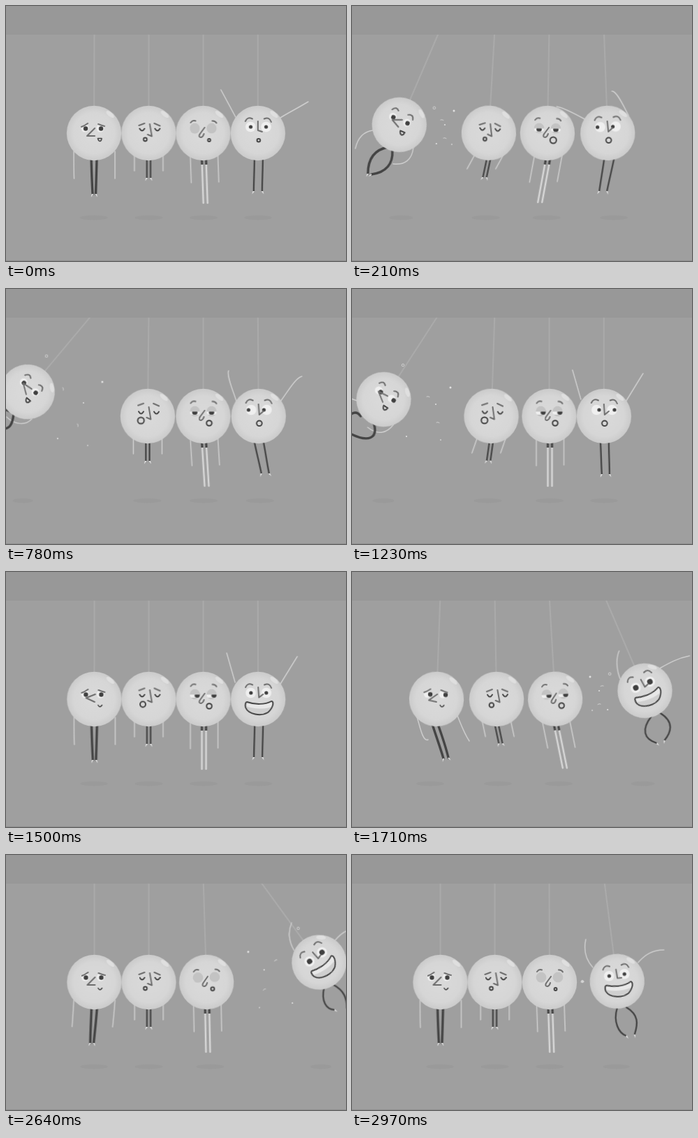
Write an HTML page without scripts that moves like this. It is 487 px wide and 365 px high and loops after 3000 ms.

```html
<!DOCTYPE html>
<html lang="en">
<head>
<meta charset="utf-8">
<title>Cradle</title>
<style>
html, body { margin: 0; width: 100%; height: 100%; overflow: hidden; background: #9f9f9f; }
svg { display: block; width: 487px; height: 365px; }
path, line { fill: none; stroke-linecap: round; stroke-linejoin: round; }

.anim, .swing, .level, .lean, .bit { animation: 3s ease-in-out infinite; }
.late { animation-delay: -1.5s; }

/* balls hang from a pivot; limbs are turned back upright */
.swing { --k: 1; transform-origin: 0 -149px; }
.level { --k: -1; }
.left { --s: 1; }
.right { --s: -1; }
.outer { animation-name: outer; }
.inner { animation-name: inner; }
@keyframes outer {
  0% { transform: rotate(0deg); animation-timing-function: cubic-bezier(.17,.48,.45,1); }
  25% { transform: rotate(calc(var(--s) * var(--k) * 40deg)); animation-timing-function: cubic-bezier(.76,0,.88,.4); }
  50% { transform: rotate(0deg); animation-timing-function: ease-out; }
  57% { transform: rotate(calc(var(--s) * var(--k) * 2.1deg)); }
  74% { transform: rotate(calc(var(--s) * var(--k) * .4deg)); }
  85%, 100% { transform: rotate(0deg); }
}
@keyframes inner {
  0% { transform: rotate(0deg); animation-timing-function: ease-out; }
  7% { transform: rotate(calc(var(--s) * var(--k) * 3.3deg)); }
  26% { transform: rotate(calc(var(--s) * var(--k) * .6deg)); }
  41% { transform: rotate(calc(var(--s) * var(--k) * 1.9deg)); }
  46% { transform: rotate(calc(var(--s) * var(--k) * 2.8deg)); }
  49% { transform: rotate(calc(var(--s) * var(--k) * .2deg)); }
  50% { transform: rotate(0deg); animation-timing-function: ease-out; }
  57% { transform: rotate(calc(var(--s) * var(--k) * -1deg)); }
  72%, 100% { transform: rotate(0deg); }
}

.string { stroke: #bcbcbc; stroke-width: .8; }
.arm { stroke: #cecece; stroke-width: 1.5; }
.leg { stroke: #444; stroke-width: 2.3; }
.thick { stroke-width: 3.4; }
.pale { stroke: #d6d6d6; stroke-width: 2.5; }
.short { stroke-width: 3.2; stroke-linecap: butt; }
.brow, .nose { stroke: #6e6e6e; stroke-width: 2; }
.ink { stroke: #444; stroke-width: 2; fill: none; }
.fine { stroke-width: 1.6; }
.white { fill: #efefef; }
.pupil { fill: #404040; }
.lid { fill: #c3c3c3; }
.foot { fill: #e6e6e6; }
.lf { marker-end: url(#footL); }
.rf { marker-end: url(#footR); }

/* straight limbs */
.lean { transform-box: fill-box; transform-origin: 50% 0; }
.lean2 { animation-name: lean2; }
.lean3 { animation-name: lean3; }
@keyframes lean2 {
  0%, 26%, 50%, 74%, 100% { transform: rotate(0deg); }
  7% { transform: rotate(calc(12deg * var(--m, 1))); }
  41% { transform: rotate(calc(8deg * var(--m, 1))); }
  57% { transform: rotate(-12deg); }
}
@keyframes lean3 {
  0%, 100% { transform: rotate(-2deg); }
  7% { transform: rotate(10.5deg); }
  26% { transform: rotate(-3.6deg); }
  41%, 50%, 74% { transform: rotate(0deg); }
  57% { transform: rotate(-11.5deg); }
}

/* first ball */
.armA { animation-name: armA; }
.armB { animation-name: armB; }
.legA { animation-name: legA; }
.legB { animation-name: legB; }
@keyframes armA {
  0%, 50%, 97%, 100% { d: path("M-29 26C-29 39 -29 52 -28.5 65"); }
  7% { d: path("M-38 8C-52 10 -60 20 -63 34"); }
  26% { d: path("M-38 10C-50 5 -60 0 -68 -8"); }
  41% { d: path("M-38 2C-42 1 -46 -1 -52 -3"); }
  57% { d: path("M-28 26C-24 37 -20 62 -12 58"); }
  74% { d: path("M-30 24C-32 35 -35 47 -39 61"); }
}
@keyframes armB {
  0%, 50%, 97%, 100% { d: path("M30 26C30 39 30 52 30 65"); }
  7% { d: path("M20 33C18 50 8 58 -9 56"); }
  26% { d: path("M6 39C-2 48 -18 48 -30 36"); }
  41% { d: path("M14 36C5 48 -8 52 -23 40"); }
  57% { d: path("M30 24C35 36 40 50 47 60"); }
  74% { d: path("M29 25C26 36 23 48 18 62"); }
}
@keyframes legA {
  0%, 50%, 97%, 100% { d: path("M-4 36C-3.5 55 -3 70 -2 87"); }
  7% { d: path("M-16 32C-38 36 -45 52 -45 70"); }
  26% { d: path("M-25 28C-36 22 -44 25 -55 30"); }
  41% { d: path("M-33 24C-38 17 -44 17 -52 26"); }
  57% { d: path("M-6 36C-1 52 5 68 10 85"); }
  74% { d: path("M-4 36C-7 52 -11 70 -14 87"); }
}
@keyframes legB {
  0%, 50%, 97%, 100% { d: path("M4 36C3.5 55 3 70 2.5 87"); }
  7% { d: path("M-10 37C-9 55 -18 68 -40 71"); }
  26% { d: path("M-20 33C-22 48 -26 54 -38 53"); }
  41% { d: path("M-14 35C-8 56 -22 62 -48 49"); }
  57% { d: path("M2 36C7 50 13 67 17 84"); }
  74% { d: path("M4 36C1 52 -4 70 -8 87"); }
}
.browA { animation-name: browA; }
.browB { animation-name: browB; }
.noseA { animation-name: noseA; }
.lookA { animation-name: lookA; }
.mouthA { animation-name: mouthA; transform-origin: 8.5px 9px; }
@keyframes browA {
  0%, 50%, 100% { d: path("M-18 -9Q-13 -11 -9 -14"); }
  6%, 43% { d: path("M-18 -16Q-14 -23 -9 -18"); }
}
@keyframes browB {
  0%, 50%, 100% { d: path("M6 -13Q11 -11 15 -10"); }
  6%, 43% { d: path("M6 -18Q13 -22 15 -14"); }
}
@keyframes noseA {
  0%, 85%, 100% { d: path("M1 -7L-10 4L1 4"); }
  7% { d: path("M1 -8L-12 -2.5L0 3.5"); }
  26%, 43% { d: path("M2 -7L-12.5 -5.5L1 4"); }
  57% { d: path("M1 -7L-11 2L0 4"); }
}
@keyframes lookA {
  0%, 26%, 50%, 74%, 100% { transform: translateX(0); }
  41%, 57% { transform: translateX(2.8px); }
}
@keyframes mouthA {
  0%, 50%, 100% { transform: scale(1); }
  7%, 42% { transform: scale(1.25); }
}

/* second ball */
.brow2 { animation-name: brow2; }
.o2 { animation-name: o2; }
@keyframes brow2 {
  0%, 7%, 55%, 100% { transform: translateY(0); }
  24%, 43% { transform: translateY(-4.2px); }
}
@keyframes o2 {
  0%, 7%, 74%, 100% { r: 2.4px; transform: translate(0, 0); }
  24%, 43% { r: 4.6px; transform: translate(-4.6px, -2.6px); }
  57% { r: 3.3px; transform: translate(-2.4px, -.6px); }
}

/* third ball */
.open { animation-name: open; }
.look3 { animation-name: look3; }
.brow3 { animation-name: brow3; }
.o3 { animation-name: o3; }
@keyframes open {
  0%, 92%, 100% { transform: translateY(0); }
  5%, 72% { transform: translateY(-7.5px); }
}
@keyframes brow3 {
  0%, 92%, 100% { transform: translateY(0); }
  5%, 72% { transform: translateY(-3.5px); }
}
@keyframes look3 {
  0%, 27%, 74%, 100% { transform: translateX(0); }
  40%, 58% { transform: translateX(3.5px); }
}
@keyframes o3 {
  0%, 100% { r: 1.9px; }
  7% { r: 4.5px; }
  26%, 57% { r: 3.8px; }
  74% { r: 3.2px; }
}

/* last ball */
.armC { animation-name: armC; }
.armD { animation-name: armD; }
.legC { animation-name: legC; }
.legD { animation-name: legD; }
@keyframes armC {
  0%, 100% { d: path("M-32 -23C-39 -36 -46 -49 -53 -62"); }
  7% { d: path("M-33 -20C-44 -26 -62 -36 -73 -38"); }
  26% { d: path("M-32 -22C-36 -35 -46 -58 -43 -65"); }
  41%, 50% { d: path("M-33 -24C-37 -38 -41 -52 -45 -66"); }
  57% { d: path("M-34 -14C-42 -30 -41 -48 -37 -57"); }
  74% { d: path("M-37 -12C-42 -30 -38 -45 -31 -50"); }
  99% { d: path("M-35 -20C-46 -32 -48 -46 -45 -60"); }
}
@keyframes armD {
  0%, 100% { d: path("M32 -22C45 -30 59 -37 72 -45"); }
  7% { d: path("M30 -25C24 -36 13 -61 6 -60"); }
  26% { d: path("M32 -22C41 -34 53 -55 62 -57"); }
  41%, 50% { d: path("M32 -22C40 -35 48 -48 56 -61"); }
  57% { d: path("M21 -32C35 -40 48 -47 64 -50"); }
  74% { d: path("M12 -38C17 -45 23 -51 32 -53"); }
  99% { d: path("M30 -27C40 -38 50 -45 67 -45"); }
}
@keyframes legC {
  0%, 50%, 100% { d: path("M-5 37C-5 52 -6 68 -6 83"); }
  7% { d: path("M-5 37C-7 52 -10 68 -12 83"); }
  26% { d: path("M-6 37C-3 52 1 67 4 82"); }
  41% { d: path("M-5 37C-4 52 -4 68 -3 83"); }
  57% { d: path("M9 37C-5 55 -2 69 17 75"); }
  74% { d: path("M18 34C16 52 22 57 36 53"); }
  99% { d: path("M0 38C-6 58 2 74 13 78"); }
}
@keyframes legD {
  0%, 50%, 100% { d: path("M7 37C7 52 6 68 6 83"); }
  7% { d: path("M9 37C6 52 2 68 -1 83"); }
  26% { d: path("M7 37C10 52 12 67 15 82"); }
  41% { d: path("M7 37C7 52 8 68 8 83"); }
  57% { d: path("M22 32C43 45 37 60 28 71"); }
  74% { d: path("M30 24C44 30 55 38 62 52"); }
  99% { d: path("M13 37C31 48 30 60 25 76"); }
}
.browC { animation-name: browC; }
.noseC { animation-name: noseC; }
.lookC { animation-name: lookC; }
.pupilC { animation-name: pupilC; }
.o4 { animation-name: o4; }
@keyframes browC {
  0%, 50%, 100% { transform: translateY(0); }
  7%, 43% { transform: translateY(-2px); }
  56%, 98% { transform: translateY(-4px); }
}
@keyframes noseC {
  0%, 100% { d: path("M0 -17L0 -4L6 -2"); }
  6%, 48% { d: path("M0 -17L1 -2L7 -7"); }
  56%, 98% { d: path("M1 -17L2 -5L8 -7"); }
}
@keyframes lookC {
  0%, 50%, 100% { transform: translateX(0); }
  7%, 27% { transform: translateX(-4px); }
  40%, 44% { transform: translateX(3.5px); }
}
@keyframes pupilC {
  0%, 50%, 99%, 100% { r: 2.6px; }
  56%, 85% { r: 4px; }
}
@keyframes o4 { 0%, 50%, 100% { r: 2.3px; } 6%, 45% { r: 3.8px; } }

/* half-loop switches */
.firstHalf { animation: show 3s step-end infinite; }
.lastHalf { animation: show 3s step-end -1.5s infinite; }
@keyframes show { 0% { opacity: 1; } 50%, 100% { opacity: 0; } }

/* shadows */
.shade { fill: #9a9a9a; }
.sh1 { animation-name: shOuter; }
.sh2 { animation-name: shInner; }
@keyframes shOuter {
  0% { transform: translateX(0); animation-timing-function: cubic-bezier(.17,.4,.45,1); }
  25% { transform: translateX(calc(var(--s) * -102px)) scaleX(.72); animation-timing-function: cubic-bezier(.68,0,.88,.4); }
  50% { transform: translateX(0); }
  57% { transform: translateX(calc(var(--s) * -14px)); }
  74% { transform: translateX(calc(var(--s) * -3px)); }
  85%, 100% { transform: translateX(0); }
}
@keyframes shInner {
  0%, 50%, 74%, 100% { transform: translateX(0); }
  7% { transform: translateX(calc(var(--s) * -13px)); }
  26% { transform: translateX(calc(var(--s) * -2px)); }
  41% { transform: translateX(calc(var(--s) * -10px)); }
  57% { transform: translateX(calc(var(--s) * 4.5px)); }
}

/* sparks fly out and fall back */
.bit { animation-name: bit; stroke: #cfcfcf; stroke-width: 1; fill: none; }
.dot { fill: #e2e2e2; stroke: none; }
.p1 { --a: 118px 146px; --b: 58px 96px; --c: 73px 109px; }
.p2 { --a: 146px 150px; --b: 138px 133px; --c: 141px 141px; }
.p3 { --a: 129px 163px; --b: 82px 143px; --c: 109px 154px; }
.p4 { --a: 133px 170px; --b: 111px 163px; --c: 120px 165px; }
.p5 { --a: 133px 189px; --b: 103px 195px; --c: 123px 191px; }
.p6 { --a: 121px 197px; --b: 74px 214px; --c: 78px 211px; }
.p7 { --a: 143px 198px; --b: 117px 224px; --c: 127px 216px; }
@keyframes bit {
  0% { translate: 162px 182px; opacity: 0; animation-timing-function: ease-out; }
  1% { opacity: 1; }
  7% { translate: var(--a); rotate: 0deg; animation-timing-function: ease-out; }
  26% { translate: var(--b); rotate: 70deg; animation-timing-function: ease-in; }
  41% { translate: var(--c); rotate: 0deg; animation-timing-function: ease-in; }
  49% { translate: 157px 181px; opacity: 1; }
  50%, 100% { translate: 162px 182px; opacity: 0; }
}
</style>
</head>
<body>
<svg viewBox="0 0 487 365">
<defs>
  <radialGradient id="skin">
    <stop offset="0" stop-color="#dadada"/>
    <stop offset=".75" stop-color="#d6d6d6"/>
    <stop offset="1" stop-color="#cbcbcb"/>
  </radialGradient>
  <marker id="footL" orient="auto" markerUnits="userSpaceOnUse" overflow="visible"><path class="foot" style="fill:#e6e6e6" d="M0 -1.3L4.5 2.5L0 1.3z"/></marker>
  <marker id="footR" orient="auto" markerUnits="userSpaceOnUse" overflow="visible"><path class="foot" style="fill:#e6e6e6" d="M0 1.3L4.5 -2.5L0 -1.3z"/></marker>
  <clipPath id="eye"><circle r="7.5"/></clipPath>
  <g id="ball">
    <circle r="39.2" fill="url(#skin)"/>
    <ellipse rx="7" ry="3" fill="#dfdfdf" transform="translate(23 -27) rotate(40)"/>
  </g>
  <ellipse id="shadow" class="shade" rx="20" ry="3.2"/>
</defs>

<rect width="487" height="365" fill="#9f9f9f"/>
<rect y="364" width="487" height="1" fill="#919191"/>

<g transform="translate(126 303)"><use href="#shadow" class="anim left sh1"/></g>
<g transform="translate(204.5 303)"><use href="#shadow" class="anim left sh2"/></g>
<g transform="translate(283 303)"><use href="#shadow" class="anim right sh2 late"/></g>
<g transform="translate(361 303)"><use href="#shadow" class="anim right sh1 late"/></g>

<g>
  <circle class="bit p1" r="1.8"/>
  <circle class="bit dot p2" r="1.5"/>
  <path class="bit p3" d="M-2 0Q0 -1 2 .5"/>
  <circle class="bit dot p4" r="1"/>
  <path class="bit p5" d="M-2 0Q0 -1 2 .5"/>
  <circle class="bit dot p6" r="1.1"/>
  <circle class="bit p7" r=".7"/>
</g>
<g transform="translate(487) scale(-1 1)">
  <circle class="bit late p1" r="1.8"/>
  <circle class="bit late dot p2" r="1.5"/>
  <path class="bit late p3" d="M-2 0Q0 -1 2 .5"/>
  <circle class="bit late dot p4" r="1"/>
  <path class="bit late p5" d="M-2 0Q0 -1 2 .5"/>
  <circle class="bit late dot p6" r="1.1"/>
  <circle class="bit late p7" r=".7"/>
</g>

<g transform="translate(126.5 182)" class="left">
  <g class="swing outer">
    <line class="string" y1="-149" y2="-38"/>
    <g class="level outer">
      <path class="anim arm armA"/>
      <path class="anim arm armB"/>
      <path class="anim leg thick lf legA"/>
      <path class="anim leg thick rf legB"/>
    </g>
    <use href="#ball"/>
    <circle class="white" cx="-13" cy="-7" r="5.5"/>
    <circle class="white" cx="9" cy="-7" r="5.5"/>
    <g class="anim lookA">
      <circle class="pupil" cx="-12" cy="-6.5" r="3.2"/>
      <circle class="pupil" cx="10" cy="-6.5" r="3.2"/>
    </g>
    <path class="anim brow browA"/>
    <path class="anim brow browB"/>
    <path class="anim nose noseA"/>
    <g class="firstHalf"><path class="anim ink fine mouthA" d="M5.5 7.5H11Q10.5 11.5 8.5 11.5Q6 11 5.5 7.5z"/></g>
    <path class="ink fine lastHalf" d="M5.5 8.5Q8 13.5 11 8.5"/>
  </g>
</g>

<g transform="translate(204.5 182)" class="left">
  <g class="swing inner">
    <line class="string" y1="-149" y2="-38"/>
    <g class="level inner">
      <line class="lean lean2 arm" style="--m:2.4" x1="-20.5" y1="32" x2="-20.5" y2="54"/>
      <line class="lean lean2 arm" style="--m:2.4" x1="20.5" y1="32" x2="20.5" y2="54"/>
      <line class="lean lean2 leg lf" x1="-2.6" y1="36" x2="-2.6" y2="64"/>
      <line class="lean lean2 leg rf" x1="2.6" y1="36" x2="2.6" y2="64"/>
    </g>
    <use href="#ball"/>
    <path class="anim brow brow2" d="M-14 -11L-6 -14M8 -14L16 -10.5"/>
    <path class="ink" d="M-13 -6.5Q-9.5 -.5 -6 -6.5M9 -6.5Q12.5 -.5 16 -6.5"/>
    <path class="nose" d="M1.5 -13L4.5 4.5L-1.5 2"/>
    <circle class="anim ink o2" cx="-5" cy="9" r="2.4"/>
  </g>
</g>

<g transform="translate(282.5 182)" class="right">
  <g class="swing inner late">
    <line class="string" y1="-149" y2="-38"/>
    <g class="level inner late">
      <line class="lean lean3 arm" x1="-18.5" y1="32" x2="-18.5" y2="71"/>
      <line class="lean lean3 arm" x1="21" y1="32" x2="21" y2="70"/>
      <g class="lean lean3">
        <path class="pale" d="M-2 36V100"/>
        <path class="leg short" d="M-2 36V45"/>
      </g>
      <g class="lean lean3">
        <path class="pale" d="M4 36V100"/>
        <path class="leg short" d="M4 36V45"/>
      </g>
    </g>
    <use href="#ball"/>
    <g transform="translate(-12 -7)" clip-path="url(#eye)">
      <circle class="white" r="7.5"/>
      <circle class="pupil anim look3" cy="1.5" r="3.8"/>
      <rect class="lid" x="-8" y="4.8" width="16" height="4"/>
      <rect class="lid anim open" x="-8" y="-8" width="16" height="16"/>
    </g>
    <g transform="translate(12 -7)" clip-path="url(#eye)">
      <circle class="white" r="7.5"/>
      <circle class="pupil anim look3" cy="1.5" r="3.8"/>
      <rect class="lid" x="-8" y="4.8" width="16" height="4"/>
      <rect class="lid anim open" x="-8" y="-8" width="16" height="16"/>
    </g>
    <path class="anim brow brow3" d="M-18 -15Q-15 -19 -11 -17.5M13 -17.5Q17 -18 19 -14.5"/>
    <path class="nose" d="M2 -8L-5 1.5Q-7 6 -3 6Q0 5 1 1"/>
    <circle class="anim ink o3" cx="8.5" cy="10" r="1.9"/>
  </g>
</g>

<g transform="translate(360.8 182)" class="right">
  <g class="swing outer late">
    <line class="string" y1="-149" y2="-38"/>
    <g class="level outer late">
      <path class="anim arm armC"/>
      <path class="anim arm armD"/>
      <path class="anim leg lf legC"/>
      <path class="anim leg rf legD"/>
    </g>
    <use href="#ball"/>
    <circle class="white" cx="-10.5" cy="-9" r="7.3"/>
    <circle class="white" cx="11.7" cy="-9" r="7.3"/>
    <g class="anim lookC">
      <circle class="anim pupil pupilC" cx="-10.3" cy="-9" r="2.6"/>
      <circle class="anim pupil pupilC" cx="11.7" cy="-9" r="2.6"/>
    </g>
    <path class="anim brow browC" d="M-18 -17Q-15 -24 -8 -20.5M9 -20.5Q16 -24 19 -16"/>
    <path class="anim nose noseC"/>
    <g class="firstHalf"><circle class="anim ink o4" cx="1" cy="10.3" r="2.3"/></g>
    <g class="lastHalf">
      <path style="fill:#cfcfcf" d="M-16 4C-5 8 10 8 19 3C23 3 22 12 14 19C4 25 -14 22 -18 12C-19 7 -18 4 -16 4z"/>
      <path style="fill:#e8e8e8" d="M-16 4C-5 8 10 8 19 3C21 4 21 8 19 11C8 15 -8 14 -17 10z"/>
      <path class="ink" d="M-16 4C-5 8 10 8 19 3C23 3 22 12 14 19C4 25 -14 22 -18 12C-19 7 -18 4 -16 4z"/>
    </g>
  </g>
</g>

<rect width="487" height="41" fill="#989898"/>
</svg>
</body>
</html>
```
